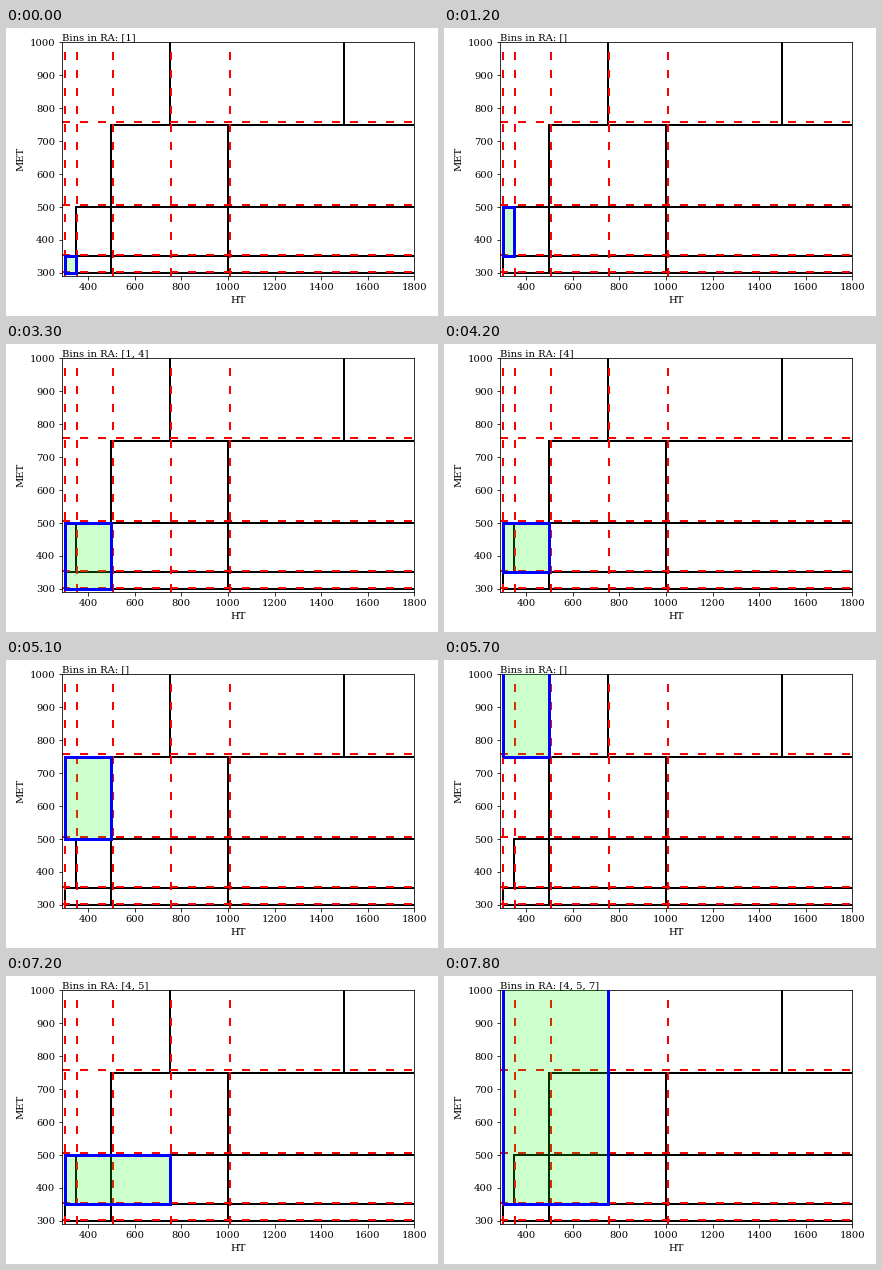
Animation of 432 by 288 pixels, one loop 8 s. Source, as a matplotlib script:

```python
from itertools import combinations, product

import matplotlib.pyplot as plt
from matplotlib.animation import FuncAnimation
from matplotlib.patches import Rectangle

plt.rcParams.update({"font.family": "DejaVu Serif", "font.size": 10})

FAR = 9999
HT_EDGES = [300, 350, 500, 750, 1000, FAR]
MET_EDGES = [300, 350, 500, 750, FAR]
TICK_MS, STEP_TICKS, TICKS = 100, 3, 80

# Each MET row with its HT edges; bins are numbered row by row.
ROWS = [
    ((300, 350), (300, 500, 1000, FAR)),
    ((350, 500), (350, 500, 1000, FAR)),
    ((500, 750), (500, 1000, FAR)),
    ((750, FAR), (750, 1500, FAR)),
]
BINS = [(ht, met) for met, edges in ROWS for ht in zip(edges, edges[1:])]
REGIONS = list(product(combinations(HT_EDGES, 2), combinations(MET_EDGES, 2)))


def overlaps(a, b):
    return a[0] < b[1] and b[0] < a[1]


def add_box(ht, met, **style):
    box = Rectangle((ht[0], met[0]), ht[1] - ht[0], met[1] - met[0], **style)
    return ax.add_patch(box)


fig, ax = plt.subplots(figsize=(6, 4), dpi=72)
ax.set(xlim=(290, 1800), ylim=(290, 1000), xlabel="HT", ylabel="MET")
fig.tight_layout()

for ht, met in BINS:
    add_box(ht, met, fill=False, ec="black", lw=2)

# Guide lines sit slightly off the bin edges so both stay visible.
guide = dict(color="red", lw=2, ls=(0, (4, 5)))
for edge in HT_EDGES[:-1]:
    ax.axvline(edge * 1.01, **guide)
for edge in MET_EDGES[:-1]:
    ax.axhline(edge * 1.01, **guide)

fill = add_box((0, 1), (0, 1), fc="lime", ec="none", alpha=0.2, zorder=3)
frame = add_box((0, 1), (0, 1), fill=False, ec="blue", lw=3, zorder=4)
label = ax.text(290, 1005, "")


def update(tick):
    ht, met = REGIONS[tick // STEP_TICKS]
    for box in (fill, frame):
        box.set_bounds(ht[0], met[0], ht[1] - ht[0], met[1] - met[0])
    hits = [n for n, (bin_ht, bin_met) in enumerate(BINS, 1)
            if overlaps(ht, bin_ht) and overlaps(met, bin_met)]
    label.set_text(f"Bins in RA: {hits}")
    return fill, frame, label


anim = FuncAnimation(fig, update, frames=TICKS, interval=TICK_MS,
                     repeat=True, repeat_delay=0)
plt.show()
```
